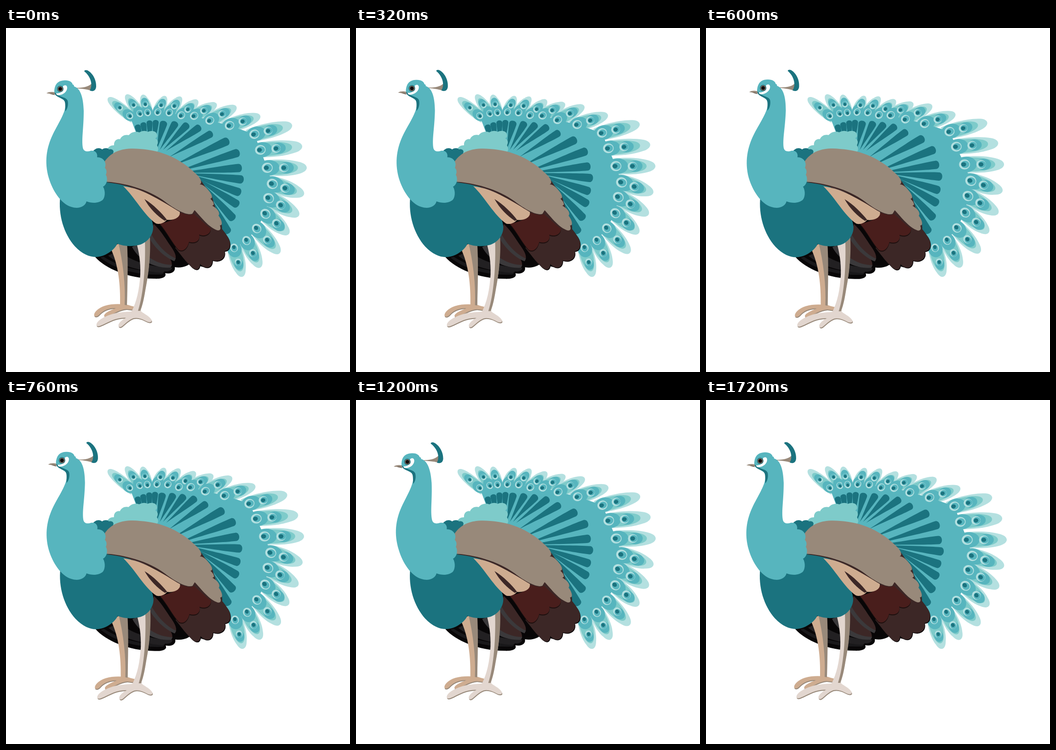
An HTML page with a canvas that plays this animation: 748 by 748 pixels, repeating every 1.76 s.

```html
<!DOCTYPE html>
<html lang="en">
<head>
<meta charset="utf-8">
<title>Peacock</title>
<style>
html, body { margin: 0; width: 100%; height: 100%; overflow: hidden; background: #fff; }
canvas { display: block; width: 100vw; height: 100vh; }
</style>
</head>
<body>
<canvas id="stage" width="748" height="748"></canvas>
<script>
const ctx = document.getElementById('stage').getContext('2d');
const LOOP = 1760, STEP = 40;
const TEAL = '#57b5be', DEEP = '#1b737f', MINT = '#7ecbca', PALE = '#b4e0e0';
const TAUPE = '#98897a', SAND = '#ceac90', BONE = '#e2d6cf';
const MAROON = '#491e1c', UMBER = '#3c2726', BLACK = '#080607', SLATE = '#3b393b';

// Feather rows: tip, outer eye, inner eye
const feathers = [
  [222,152, 250,169, 269,191], [261,145, 281,164, 291,186], [297,145, 306,164, 308,184],
  [347,148, 336,166, 330,183], [381,150, 366,168, 355,184], [417,157, 393,173, 381,190],
  [458,165, 432,180, 409,191], [501,171, 469,183, 443,201], [553,191, 516,202, 486,212],
  [622,211, 572,225, 540,231], [644,257, 589,262, 553,265], [654,304, 606,303, 568,304],
  [648,362, 609,347, 579,339], [637,408, 600,384, 571,370], [615,448, 591,424, 564,404],
  [595,490, 571,460, 545,436], [553,521, 541,489, 523,462], [514,541, 510,509, 496,478]
];
// Ends of the dark inner plumes
const plumes = [
  [285,210], [298,205], [312,201], [326,200], [344,202], [370,204], [396,208], [423,214], [449,228],
  [485,244], [508,270], [513,304], [517,330], [511,359], [506,386], [496,417], [484,447]
];

const ease = p => (1 - Math.cos(Math.PI * Math.min(1, Math.max(0, p)))) / 2;
const bell = (i, mid, left, right) => Math.exp(-(((i - mid) / (i < mid ? left : right)) ** 2));

function fill(path, color) {
  ctx.fillStyle = color;
  ctx.fill(typeof path === 'string' ? new Path2D(path) : path);
}

function fillShaded(path, color, shade, dx, dy) {
  ctx.save();
  ctx.translate(dx, dy);
  fill(path, shade);
  ctx.restore();
  fill(path, color);
}

function oval(x, y, rx, ry, color) {
  ctx.fillStyle = color;
  ctx.beginPath();
  ctx.ellipse(x, y, rx, ry, 0, 0, 7);
  ctx.fill();
}

function petal(len, w, color) {
  ctx.fillStyle = color;
  ctx.beginPath();
  ctx.moveTo(-w, -w * 0.8);
  ctx.bezierCurveTo(0, -w * 1.05, len * 0.5, -w * 1.22, len - w * 0.8, -w * 0.7);
  ctx.bezierCurveTo(len + w * 0.27, -w * 0.38, len + w * 0.27, w * 0.38, len - w * 0.8, w * 0.7);
  ctx.bezierCurveTo(len * 0.5, w * 1.22, 0, w * 1.05, -w, w * 0.8);
  ctx.fill();
}

function sway(i, bend) {
  return [
    bend * (-11 * bell(i, 8.5, 4, 3.2) + 0.7 * Math.max(0, i - 14)),
    bend * -7.5 * bell(i, 11, 4, 3)
  ];
}

function plume(x, y, i) {
  const rx = 300 + 6.9 * i, ry = 265 + 50 * ease((i - 6.5) / 4);
  const len = Math.hypot(x - rx, y - ry), r = i < 4 ? 6.5 : i < 9 ? 8 : 9;
  ctx.save();
  ctx.translate(rx, ry);
  ctx.rotate(Math.atan2(y - ry, x - rx));
  ctx.fillStyle = DEEP;
  ctx.beginPath();
  ctx.moveTo(0, 0);
  ctx.bezierCurveTo(len * 0.4, -r * 0.4, len * 0.75, -r * 0.95, len - r * 0.8, -r);
  ctx.bezierCurveTo(len + r * 0.27, -r, len + r * 0.27, r, len - r * 0.8, r);
  ctx.bezierCurveTo(len * 0.75, r * 0.95, len * 0.4, r * 0.4, 0, 0);
  ctx.fill();
  ctx.restore();
}

function drawTail(bend) {
  const items = feathers.map((f, i) => {
    const s = sway(i, bend);
    const [tx, ty, ox, oy, x, y] = f.map((v, n) => v + s[n % 2]);
    return {
      x, y, angle: Math.atan2(ty - y, tx - x),
      w: 11.5 + 6 * bell(i, 12, 6, 9),
      k: 0.64 + 0.36 * bell(i, 12, 6, 5),
      len: Math.hypot(tx - x, ty - y),
      eye: Math.hypot(ox - x, oy - y)
    };
  });
  const each = draw => items.forEach(f => {
    ctx.save();
    ctx.translate(f.x, f.y);
    ctx.rotate(f.angle);
    draw(f);
    ctx.restore();
  });

  each(f => petal(f.len, f.w, PALE));
  each(f => petal(f.eye + (f.len - f.eye) * 0.6, f.w * 0.84, MINT));

  ctx.fillStyle = TEAL;
  ctx.beginPath();
  ctx.moveTo(281, 223);
  items.forEach(f => ctx.lineTo(f.x, f.y));
  ctx.lineTo(486, 484);
  ctx.lineTo(400, 400);
  ctx.lineTo(300, 270);
  ctx.fill();

  each(({ eye, k, w }) => {
    oval(eye + 4 * k, 0, 16 * k, 12.5 * k, TEAL);
    oval(4 * k, 0, 23 * k, w * 0.97, TEAL);
    oval(eye - 2 * k, 0, 10.5 * k, 9.8 * k, PALE);
    oval(eye, 0, 8.2 * k, 7.6 * k, TEAL);
    oval(eye - 2 * k, 0, 5.2 * k, 4.6 * k, DEEP);
    oval(0, 0, 12 * k, 11 * k, PALE);
    oval(1.5 * k, 0, 9 * k, 8 * k, TEAL);
    oval(-2 * k, 0, 5.5 * k, 4.7 * k, DEEP);
  });
  plumes.forEach(([x, y], i) => {
    const s = sway(i, bend);
    plume(x + s[0], y + s[1], i);
  });
}

function drawUnderTail() {
  fill('M194,498 C215,522 265,545 322,545 C341,546 350,541 346,533 C359,536 369,530 367,520 C384,523 397,516 400,512 L430,520 L420,400 L260,342 L290,430Z', BLACK);
  fill('M205,499 C235,524 285,538 335,536 C342,537 343,533 342,531 C290,531 245,519 212,497Z', '#19181a');
  fill('M222,495 C245,514 285,528 335,532 C341,533 344,531 345,529 C355,530 361,526 361,521 C315,520 272,508 245,484Z', '#222022');
  fill('M282,474 C300,498 330,518 359,520 C364,511 357,500 348,492 C338,480 326,464 314,452Z', UMBER);
  fill('M274,476 C290,507 325,523 358,521 L361,515 C330,515 302,497 284,471Z', SLATE);
  fill('M313,455 C328,478 347,496 366,507 C374,497 365,484 355,470 C345,455 334,437 321,426Z', UMBER);
  fill('M311,456 C325,481 348,500 366,507 L369,501 C350,493 331,474 317,450Z', SLATE);
}

function drawLegs() {
  const backFoot = 'M192,626 C190,619 200,609 215,604 C231,599 252,600 265,602 C275,606 289,607 293,612 C286,615 274,612 262,611 C248,612 235,620 223,627 C215,630 211,627 215,622 C221,616 232,612 239,609 C225,608 211,614 204,622 C199,628 194,628 192,626Z';
  const frontFoot = 'M197,647 C195,640 206,631 225,624 C243,617 260,618 274,616 L292,614 C296,620 311,625 316,634 C319,640 312,641 306,638 C295,632 286,629 277,631 C268,634 259,643 253,648 C247,653 243,649 245,644 C248,638 255,633 261,630 C241,629 225,638 211,645 C204,648 200,650 197,647Z';
  fillShaded(backFoot, SAND, TAUPE, 0.8, 2);
  fill('M227,478 L258,462 C264,510 264,560 263,603 L248,603 C249,560 245,515 227,478Z', SAND);
  fill('M243,462 L263,462 C266,510 264,560 263,603 L258,602 C260,560 255,510 243,462Z', TAUPE);
  fillShaded(frontFoot, BONE, TAUPE, 0.8, 2);
  fill('M283,465 L312,455 C314,500 309,540 303,570 C299,595 295,608 292,615 L273,617 C284,595 290,570 292,535 C293,510 289,485 283,465Z', BONE);
  fill('M302,460 L313,455 C315,500 309,540 303,570 C299,595 295,608 292,615 L287,615 C299,580 304,515 302,460Z', TAUPE);
}

function drawWing() {
  const flight = 'M368,478 C378,490 388,505 399,515 C410,528 421,529 422,513 C434,526 449,522 449,505 C463,510 479,502 475,485 C489,484 490,467 482,454 C476,445 471,438 465,432 L410,420Z';
  const coverts = 'M334,425 C355,422 375,413 379,402 L409,399 C430,409 446,424 445,439 C443,450 430,454 420,449 C423,463 412,469 398,465 C395,478 386,488 375,482 C361,467 350,443 334,425Z';
  fillShaded(flight, UMBER, BLACK, 1, 1.5);
  fillShaded(coverts, MAROON, '#1c0f0e', 0, 2);
  fill('M218,336 C255,338 311,356 345,381 C372,401 397,411 408,404 C425,418 442,438 462,445 C469,446 471,437 469,428 L455,390 L448,367 L425,333 L400,310 L300,320Z', UMBER);
  fill('M255,344 C302,350 342,379 378,400 C380,411 366,419 350,417 C345,423 335,428 326,425 C300,407 280,368 255,344Z', SAND);
  fill('M301,372 C321,384 338,402 350,417 L345,419 C329,409 312,392 301,372Z', UMBER);
  fill('M214,334 C255,336 309,350 345,377 C371,397 394,408 405,404 L410,396 C425,412 441,434 460,440 C468,441 467,434 465,429 C472,430 470,418 462,408 C467,402 459,392 448,386 C455,386 452,378 444,371 C450,371 449,363 441,354 C435,346 428,340 421,340 C427,338 425,329 416,320 C382,285 340,266 292,263 C258,260 232,265 214,291Z', TAUPE);
}

// Leans the neck: the shift grows towards the head
function lean(path, amount) {
  return new Path2D(path.replace(/(-?[\d.]+),(-?[\d.]+)/g, (_, a, b) => {
    const x = +a, y = +b;
    const side = y > 240 ? Math.min(1, Math.max(0, (240 - x) / 60)) : 1;
    const k = Math.max(0, (320 - y) / 180) ** 1.1 * side * amount;
    return (x + 6 * k) + ',' + (y + 0.027 * (x - 190) * k);
  }));
}

function drawHead(amount) {
  const part = (path, color) => fill(lean(path, amount), color);
  const spot = (x, y, r, color) => {
    const c = r * 0.55;
    part(`M${x - r},${y} C${x - r},${y - c} ${x - c},${y - r} ${x},${y - r} C${x + c},${y - r} ${x + r},${y - c} ${x + r},${y} C${x + r},${y + c} ${x + c},${y + r} ${x},${y + r} C${x - c},${y + r} ${x - r},${y + c} ${x - r},${y}Z`, color);
  };
  part('M153,130 C165,130 178,129 186,121 L188,137 C180,134 166,132 153,131Z', TAUPE);
  part('M170,94 C171,91 174,91 177,92 C189,98 197,114 196,128 C195,136 190,139 182,136 C190,124 184,105 170,94Z', DEEP);
  part('M105,140 C105,123 112,115 126,114 C136,113 144,117 145,123 C148,123 148,126 148,127 C161,131 168,148 169,180 C169,218 164,240 167,260 C169,270 178,269 184,267 C195,265 200,274 198,281 C212,281 220,293 215,304 C220,309 219,316 217,319 C223,329 218,342 211,345 C217,355 215,368 211,373 C203,381 188,382 175,377 C172,389 157,394 142,389 C119,382 101,353 93,326 C83,291 88,260 102,231 C116,203 129,185 130,164 C129,155 113,152 105,140Z', TEAL);
  part('M105,140 C106,148 116,151 124,155 C131,160 128,171 129,181 C134,176 136,166 134,158 C131,150 118,151 110,143Z', DEEP);
  part('M88,142 C94,138 101,139 106,140 L106,145 C100,143 94,143 88,142Z', TAUPE);
  part('M95,143 C100,142 104,143 107,146 C102,145 98,144 95,143Z', '#6e6055');
  part('M124,127 C127,123 133,124 133,130 C133,138 125,145 116,146 C112,147 109,145 109,142 C118,143 125,137 124,127Z', '#fff');
  spot(118, 132.5, 7, DEEP);
  spot(118, 132.5, 5.8, '#75675d');
  spot(118, 132.5, 4, '#100d0d');
}

function draw(ms) {
  const t = Math.floor((ms % LOOP) / STEP) * STEP;
  const bend = t < 720 ? ease(t / 650) : 1 - ease((t - 720) / 840);
  const third = LOOP / 3;
  const amount = t < third ? ease(t / third)
    : t < 2 * third ? 1 - 2 * ease(t / third - 1)
    : ease(t / third - 2) - 1;

  ctx.setTransform(1, 0, 0, 1, 0, 0);
  ctx.fillStyle = '#fff';
  ctx.fillRect(0, 0, 748, 748);
  drawTail(bend);

  // The lower body drifts slightly with the tail
  const drift = bend / 340;
  ctx.setTransform(1, 0, 1.7 * drift, 1 + drift, -510 * drift, -300 * drift);
  drawUnderTail();
  drawLegs();
  fill('M219,266 C222,258 228,255 235,255 C234,245 242,240 248,242 C251,234 260,231 267,233 C272,226 283,224 290,227 C297,223 304,223 308,226 C316,222 327,224 328,231 C330,235 328,238 325,240 C332,244 331,251 328,255 C333,262 331,269 327,270 L290,280 L235,285Z', MINT);
  fill('M187,271 C193,261 203,259 209,264 C215,260 222,261 224,264 C231,262 236,267 233,272 C235,278 228,281 223,281 L215,296 L195,285Z', DEEP);
  fill('M118,365 C113,407 126,448 150,475 C174,500 197,502 216,493 C228,487 238,478 242,469 C259,476 277,475 292,471 C309,465 321,449 320,431 C319,422 316,413 311,404 L265,338 L205,325Z', DEEP);
  drawWing();
  ctx.setTransform(1, 0, 0, 1, 0, 0);
  drawHead(amount);
}

const start = performance.now();
function tick() {
  draw(performance.now() - start);
  requestAnimationFrame(tick);
}
tick();
</script>
</body>
</html>
```
